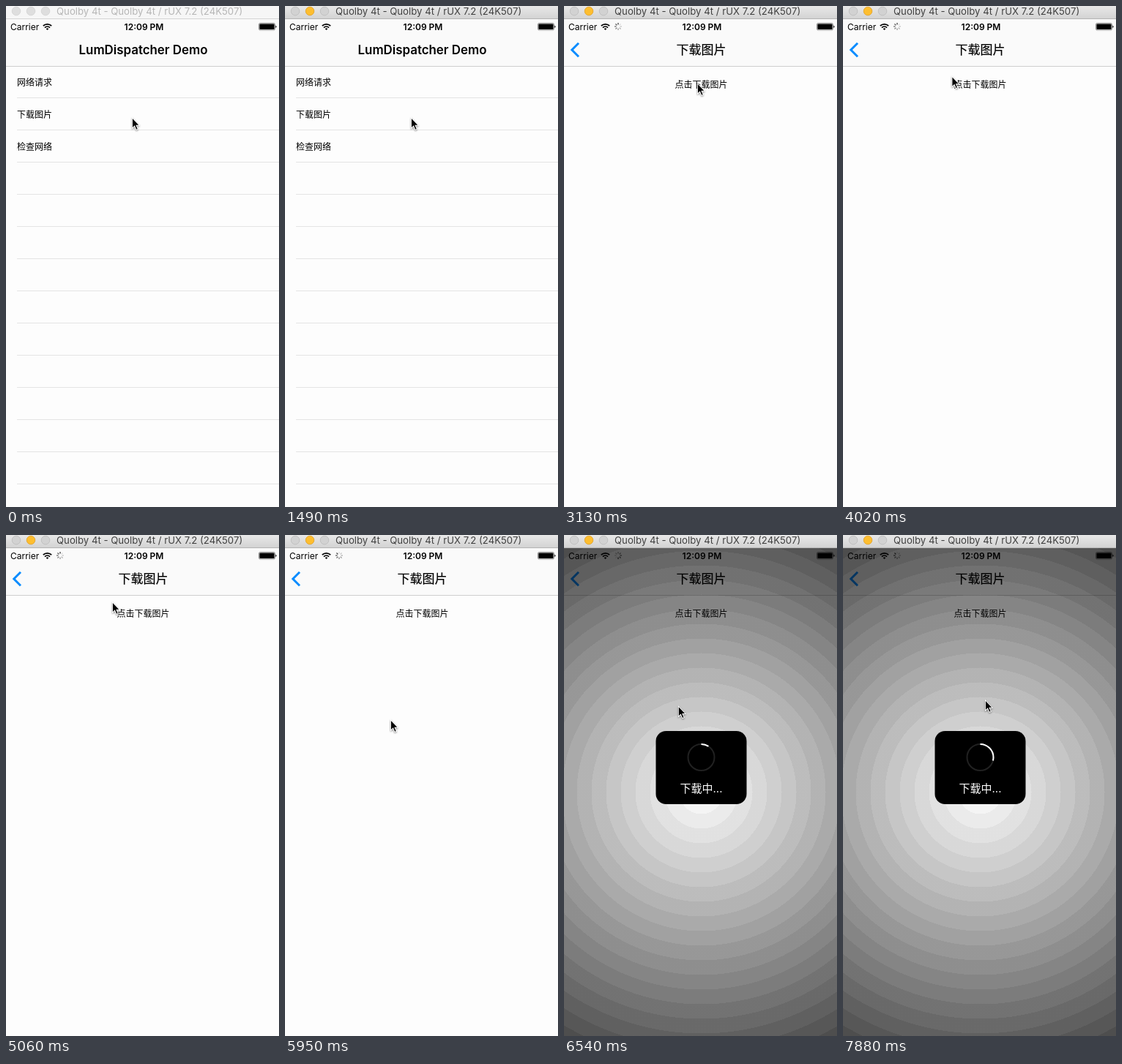
Recreate the animation shown at these times as an HTML page. Size 373 px wide and 685 px high, loop 8 s.

```html
<!DOCTYPE html>
<html lang="zh">
<head>
<meta charset="utf-8">
<style>
html, body { margin: 0; width: 100%; height: 100%; overflow: hidden; background: #fdfdfd; }
svg { display: block; }
text { font: 12px Inter, "Noto Sans CJK SC", "Noto Sans CJK", sans-serif; }
.mid { text-anchor: middle; }
.head { font-size: 16.9px; font-weight: 600; }
.cjk { font-size: 17px; font-weight: 500; stroke: #000; stroke-width: .15px; }
.clock { font-weight: 600; }
.caption { font-size: 13.2px; }
.busy { font-size: 15px; }
</style>
</head>
<body>
<svg width="373" height="685" viewBox="0 0 373 685">
  <defs>
    <linearGradient id="bar" x2="0" y2="1">
      <stop stop-color="#e8e8e8"/><stop offset="1" stop-color="#d2d2d2"/>
    </linearGradient>
    <radialGradient id="rings" gradientUnits="userSpaceOnUse" cx="187.5" cy="351.5" r="400"/>
  </defs>

  <g id="list">
    <rect width="373" height="685" fill="#fdfdfd"/>
    <path id="lines" stroke="#e4e4e4"/>
    <text x="15" y="108.6">网络请求</text>
    <text x="15" y="152.6">下载图片</text>
    <text x="15" y="196.6">检查网络</text>
  </g>
  <rect id="dim" y="83" width="373" height="602"/>
  <g id="page">
    <rect width="373" height="685" fill="#fdfdfd"/>
    <text class="mid" x="187.5" y="112">点击下载图片</text>
  </g>

  <rect y="18" width="373" height="64" fill="#fafafa"/>
  <path d="M0 82.5H373" stroke="#cecece"/>
  <text id="oldTitle" class="mid head" x="187.5" y="66">LumDispatcher Demo</text>
  <text id="newTitle" class="mid cjk" x="187.5" y="66.3">下载图片</text>
  <path id="back" d="M20 50.8L10.8 60 20 69.2" fill="none" stroke="#0a8cff" stroke-width="3"/>

  <text x="6" y="32.5">Carrier</text>
  <g fill="none" stroke="#000" stroke-width="1.8">
    <path d="M50.8 27.2a8 8 0 0 1 11.4 0M53 29.6a5 5 0 0 1 7 0"/>
    <path d="M56.5 33L54.7 31.2a2.6 2.6 0 0 1 3.6 0Z" fill="#000" stroke="none"/>
  </g>
  <g id="spinner" transform="translate(74 28)" stroke="#333" stroke-width="1.2"></g>
  <text class="mid clock" x="188.5" y="32.5">12:09 PM</text>
  <rect x="345.5" y="23.5" width="22" height="9.5" rx="1.8" fill="none" stroke="#000" stroke-width=".7" opacity=".6"/>
  <rect x="346.4" y="24.4" width="20.2" height="7.7" rx="1"/>
  <path d="M368.4 26.5a2 2 0 0 1 0 3.6Z"/>

  <rect id="shade" y="18" width="373" height="667" fill="url(#rings)"/>
  <g id="hud">
    <rect x="125.5" y="268" width="124" height="100" rx="14"/>
    <g fill="none" stroke="#fff" stroke-width="2" transform="rotate(-90 187.5 304)">
      <circle cx="187.5" cy="304" r="18" opacity=".13"/>
      <circle id="arc" cx="187.5" cy="304" r="18" pathLength="1"/>
    </g>
    <text class="mid busy" x="187.5" y="352" fill="#fff">下载中...</text>
  </g>

  <rect id="chrome" width="373" height="18"/>
  <path id="edge" d="M0 17.5H373"/>
  <g id="lights" stroke-width=".8">
    <circle cx="14" cy="7" r="5.8"/><circle cx="34" cy="7" r="5.8"/><circle cx="54" cy="7" r="5.8"/>
  </g>
  <text id="caption" class="caption" x="69" y="12">Quolby 4t - Quolby 4t / rUX 7.2 (24K507)</text>

  <g id="cursor">
    <path d="M0-1.2V15.2L3.5 12 5.7 17.1 8.9 15.8 6.8 10.8H11.2Z" fill="#fff"
      style="filter:drop-shadow(0 1px .8px #0007)"/>
    <path d="M.9 1V13L3.8 10.3 6.2 15.7 7.6 15.1 5.3 9.8H9.2Z"/>
  </g>
</svg>
<script>
const $ = id => document.getElementById(id);
const set = (el, attrs) => { for (const k in attrs) el.setAttribute(k, attrs[k]); };
const add = (parent, tag, attrs) => {
  const el = document.createElementNS("http://www.w3.org/2000/svg", tag);
  set(el, attrs);
  return parent.appendChild(el);
};
const LOOP = 8000, STEP = 148.8;

let rows = "";
for (let y = 125.5; y < 685; y += 44) rows += `M15 ${y}H373`;
set($("lines"), { d: rows });

// Banded vignette: one flat tone per 20px ring
for (let k = 0; k < 20; k++)
  for (const r of [Math.max(0, 20 * k - 10), 20 * k + 10])
    add($("rings"), "stop", { offset: r / 400, "stop-color": "#000", "stop-opacity": .0365 * k });

const spokes = Array.from({ length: 8 }, (_, i) =>
  add($("spinner"), "path", { d: "M0-2.4V-5", transform: `rotate(${i * 45})` }));

// Rows of [step, ...values], linear in between
const cursorKeys = [[0, 172, 153], [15, 172, 153], [16, 182, 109], [19, 182, 108], [21, 182, 106],
  [26, 149, 97], [34, 145, 92], [36, 145, 92], [40, 144, 253], [41, 133, 238], [49, 194, 228], [53, 194, 226]];
const arcKeys = [[41, .02], [42, .03], [49, .25], [53, .29]];
const fadeKeys = [[11, 0, 0], [12, .1, .4], [13, .5, .95], [14, .9, 1], [15, 1, 1]];

function at(keys, n) {
  const i = keys.findIndex(k => k[0] >= n);
  if (i < 0) return keys[keys.length - 1].slice(1);
  if (i === 0) return keys[0].slice(1);
  const a = keys[i - 1], b = keys[i], f = (n - a[0]) / (b[0] - a[0]);
  return a.slice(1).map((v, j) => v + (b[j + 1] - v) * f);
}

const move = (id, x, y = 0) => set($(id), { transform: `translate(${x} ${y})` });

function drawWindow(active) {
  set($("chrome"), { fill: active ? "url(#bar)" : "#f6f6f6" });
  set($("edge"), { stroke: active ? "#b4b4b4" : "#d4d4d4" });
  set($("caption"), { fill: active ? "#404040" : "#b6b6b6" });
  [...$("lights").children].forEach((c, i) => {
    const yellow = active && i === 1;
    set(c, { fill: yellow ? "#fdbe30" : active ? "#d2d2d2" : "#dedede",
      stroke: yellow ? "#e0a028" : active ? "#bcbcbc" : "#d2d2d2" });
  });
}

function drawPush(n) {
  // Critically damped spring, already under way at its first visible step
  const w = n < 12 ? 0 : (n - 11) * 2.7;
  const rest = n > 14 ? 0 : (1 + w) * Math.exp(-w);
  const [backFade, titleFade] = at(fadeKeys, n);
  move("page", 373 * rest);
  move("list", -112 * (1 - rest));
  move("newTitle", 112 * rest);
  move("oldTitle", -130 * (1 - rest));
  set($("dim"), { opacity: .08 * (1 - rest) });
  set($("back"), { opacity: backFade });
  set($("newTitle"), { opacity: titleFade });
  set($("oldTitle"), { opacity: n < 12 ? 1 : n === 12 ? .15 : 0 });
}

function drawHud(n) {
  const shown = n > 41 ? 1 : 0, entering = n === 41;
  const s = entering ? 1.03 : 1;
  set($("shade"), { opacity: entering ? .84 : shown });
  set($("hud"), { opacity: entering ? .73 : shown,
    transform: `translate(187.5 318) scale(${s}) translate(-187.5 -318)` });
  set($("arc"), { "stroke-dasharray": `${at(arcKeys, n)[0]} 2` });
}

function draw(now) {
  const n = Math.floor((now % LOOP + 10) / STEP);
  drawWindow(n >= 10);
  drawPush(n);
  drawHud(n);
  set($("spinner"), { opacity: n < 19 ? 0 : 1 });
  const lead = Math.floor(n * STEP / 125);
  spokes.forEach((p, i) => set(p, { opacity: 1 - ((lead - i) % 8 + 8) % 8 * .12 }));
  move("cursor", ...at(cursorKeys, n));
}

const start = performance.now();
function tick() {
  draw(performance.now() - start);
  requestAnimationFrame(tick);
}
tick();
</script>
</body>
</html>
```
